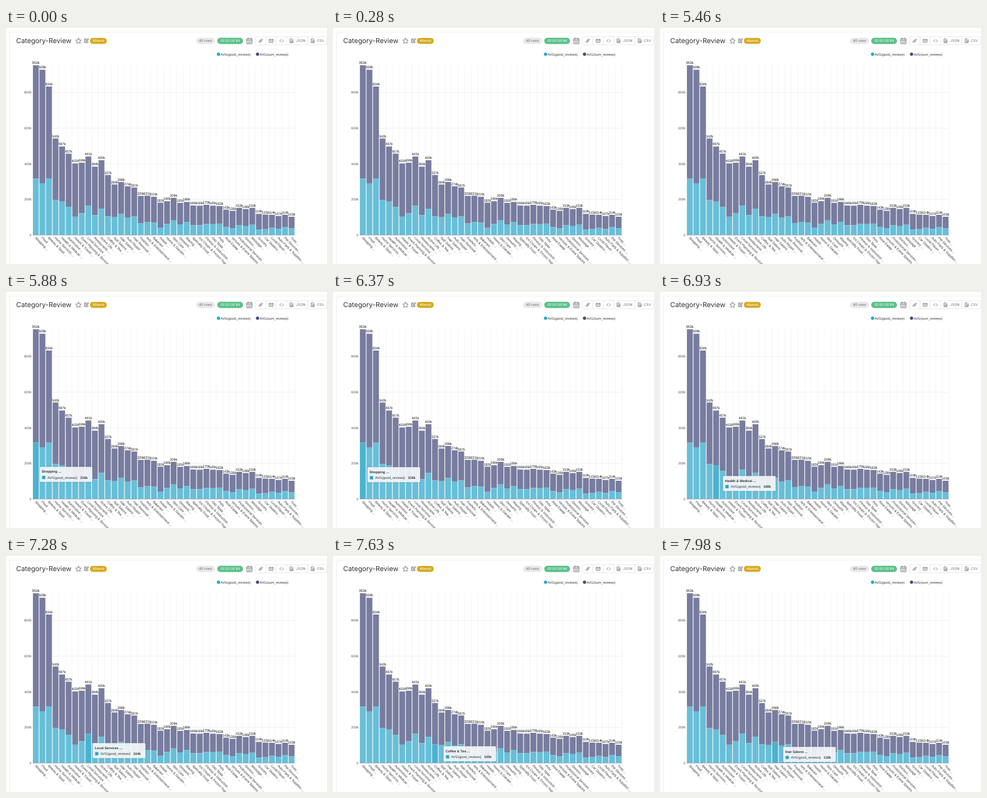
Write an HTML page that moves like this. It is 512 px wide and 375 px high and loops after 8000 ms.

```html
<!DOCTYPE html>
<html lang="en">
<head>
<meta charset="utf-8">
<title>Category-Review</title>
<style>
  html, body { margin: 0; width: 100%; height: 100%; overflow: hidden; background: #fff; }
  svg { display: block; width: 100%; height: 100%; }
  text { font: 5.4px "Liberation Sans", Arial, sans-serif; fill: #333; text-rendering: geometricPrecision; }
  .ui text { font-family: Inter, sans-serif; fill: #666; }
  .ui .title { font-size: 10.8px; fill: #333; }
  .ui .light { fill: #fff; }
  .icon { fill: none; stroke: #666; stroke-width: .8; stroke-linejoin: round; stroke-linecap: round; }
  .frame { fill: none; stroke: #e2e2e2; stroke-width: .7; }
  .value { fill: #111; stroke: #fff; stroke-width: .7; paint-order: stroke; text-anchor: middle; }
  .tick { fill: #555; text-anchor: end; }
  .bold { font-weight: 700; }
  #tip { filter: drop-shadow(0 0 1.3px rgba(0, 0, 0, .25)); }
</style>
</head>
<body>
<svg viewBox="0 0 512 375" preserveAspectRatio="none">
  <path class="frame" d="M0 6.5H512M5.5 6.5V375" stroke-opacity=".7"/>
  <g class="ui">
    <text class="title" x="16.3" y="24.3">Category-Review</text>
    <path class="icon" d="M115.6 16l1.3 2.9 3.1.3-2.3 2.1.7 3.1-2.8-1.6-2.8 1.6.7-3.1-2.3-2.1 3.1-.3z"/>
    <path class="icon" style="stroke:#444" d="M128 17.6h-2.6v5.6h5.2v-2.4M127.6 21l.3-1.4 3-3 1 1-3 3z"/>
    <rect x="133.8" y="15.7" width="27" height="9.6" rx="4.8" fill="#d6ab22"/>
    <text class="light" x="147.3" y="22.4" text-anchor="middle" font-weight="500">Altered</text>
    <rect x="303.3" y="15.6" width="29.8" height="9.8" rx="4.9" fill="#e8e8e8"/>
    <text x="318.2" y="22.4" text-anchor="middle">40 rows</text>
    <rect x="337" y="15.6" width="41" height="9.8" rx="4.9" fill="#5ac189"/>
    <text class="light" x="357.5" y="22.4" text-anchor="middle">00:00:00.84</text>
    <path class="icon" d="M384.3 17h8v8h-8zM384.3 19.4h8M386.3 15.8v2M390.3 15.8v2"/>
    <path class="icon" stroke-dasharray=".8 1.2" d="M386 21.4h5M386 23.2h5"/>
    <rect class="frame" x="397.7" y="13.7" width="113.6" height="13" rx="2"/>
    <path class="frame" d="M414.5 13.7v13M430.8 13.7v13M447.7 13.7v13M481.5 13.7v13"/>
    <g class="icon">
      <rect x="-2" y="-1.1" width="3.4" height="2.2" rx="1.1" transform="translate(405.5 21.3) rotate(-45)"/>
      <rect x="-1.4" y="-1.1" width="3.4" height="2.2" rx="1.1" transform="translate(407.5 19.3) rotate(-45)"/>
      <path d="M420.2 18.2h5.8v4.4h-5.8zl2.9 2.4 2.9-2.4M438.4 18.6l-1.8 1.8 1.8 1.8M440.8 18.6l1.8 1.8-1.8 1.8"/>
      <path id="file" d="M453.4 17.2h2.8l1.6 1.6v4.6h-4.4zM454.6 20.2h2M454.6 21.8h2"/>
      <use href="#file" x="33.8"/>
    </g>
    <text x="461.3" y="22.4">.JSON</text>
    <text x="494.8" y="22.4">.CSV</text>
  </g>
  <circle cx="339" cy="41.6" r="2.6" fill="#1fa8c9"/>
  <text x="342.3" y="43.5">AVG(good_reviews)</text>
  <circle cx="401.2" cy="41.6" r="2.6" fill="#454e7c"/>
  <text x="404.5" y="43.5">AVG(sum_reviews)</text>
  <g id="chart"></g>
  <g id="tip">
    <rect width="84" height="24" rx="1.6" fill="#fafbfd" fill-opacity=".9"/>
    <text id="tipName" class="bold" x="3.3" y="9.6"></text>
    <rect x="3.8" y="14.3" width="5.2" height="5.2" fill="#2ba5c6"/>
    <text x="12.3" y="18.9">AVG(good_reviews)</text>
    <text id="tipValue" class="bold" x="64.6" y="18.9"></text>
  </g>
</svg>
<script>
const names = `Shopping|Food|Beauty & Spas|Home Services|Health & Medical|Automotive|Hotels & Travel|Event Planning & Services|Local Services|Restaurants|Active Life|Coffee & Tea|Nail Salons|Hair Salons|Auto Repair|Hair Removal|Fashion|Arts & Entertainment|Bakeries|Hotels|Home & Garden|Skin Care|Desserts|Waxing|Specialty Food|Ice Cream & Frozen Yogurt|Fitness & Instruction|Day Spas|Pets|Real Estate|Venues & Event Spaces|Professional Services|Doctors|Massage|Grocery|Car Dealers|Local Flavor|Auto Parts & Supplies|Pet Services|Tires`
  .split('|').map(name => name + ' ...');
const sums = [953, 928, 834, 542, 497, 457, 402, 406, 441, 384, 420, 337, 284, 298, 274, 267, 220, 221, 215, 182,
  190, 209, 181, 186, 166, 165, 170, 165, 163, 143, 136, 153, 146, 153, 119, 115, 114, 107, 114, 103];
const goods = [316, 290, 318, 196, 188, 157, 103, 122, 164, 112, 148, 105, 100, 118, 99, 104, 65, 74, 70, 40,
  62, 82, 60, 74, 55, 55, 62, 61, 64, 45, 37, 56, 50, 58, 30, 33, 40, 34, 46, 37];

const LEFT = 42.4, PITCH = 10.46, BAR = 9.3, BASE = 329, RIGHT = LEFT + PITCH * names.length;
const GOOD = '#67bfd8', GOOD_HOVER = '#4ab3d0', SUM = '#787c9f';
const $ = id => document.getElementById(id);
const yOf = value => BASE - value * .2831;

function add(tag, attrs, text = '') {
  const node = document.createElementNS('http://www.w3.org/2000/svg', tag);
  for (const key in attrs) node.setAttribute(key, attrs[key]);
  node.textContent = text;
  return $('chart').appendChild(node);
}
const line = (d, stroke) => add('path', { d, stroke, 'stroke-width': .6, fill: 'none' });
const bar = (i, from, to, fill) => add('rect', {
  x: LEFT + PITCH * i + (PITCH - BAR) / 2, y: yOf(to), width: BAR, height: yOf(from) - yOf(to), fill
});

for (let i = 0; i <= names.length; i++) line(`M${LEFT + PITCH * i} 59V${BASE}`, '#eeeff2');
for (let value = 0; value <= 800; value += 200) {
  if (value) line(`M${LEFT} ${yOf(value)}H${RIGHT}`, '#e4e7ee');
  add('text', { class: 'tick', x: 40.6, y: yOf(value) + 1.9 }, value ? value + 'k' : '0');
}
const goodBars = goods.map((good, i) => {
  bar(i, good, sums[i], SUM);
  return bar(i, 0, good, GOOD);
});
line(`M${LEFT} ${BASE}H${RIGHT}`, '#8d8f98');
names.forEach((name, i) => {
  const center = LEFT + PITCH * (i + .5);
  add('text', { class: 'value', x: center, y: yOf(sums[i]) - 1.9 }, sums[i] + 'k');
  add('text', { y: 1.9, transform: `translate(${center - .6} 332.6) rotate(45)` }, name);
});

// Tooltip path: time, x, y
const path = [[5530, 53, 280], [6020, 54, 277], [6230, 54, 277], [6370, 55, 278.3],
  [6930, 100.5, 292.3], [7630, 176.3, 302.2], [7980, 196.5, 303.2]];
const LOOP = 8000, STEP = 70, SHOW = 5460, FADE = 210;

function tipAt(time) {
  const next = path.findIndex(point => point[0] >= time);
  if (next < 1) return path[next < 0 ? path.length - 1 : 0].slice(1);
  const [a, b] = [path[next - 1], path[next]];
  const part = (time - a[0]) / (b[0] - a[0]);
  return [1, 2].map(k => a[k] + (b[k] - a[k]) * part);
}

function draw(now) {
  const time = Math.floor(now % LOOP / STEP) * STEP;
  const [x, y] = tipAt(time);
  const shown = time > SHOW;
  const hovered = Math.floor((x - 9 - LEFT) / PITCH);
  $('tip').setAttribute('transform', `translate(${x} ${y})`);
  $('tip').setAttribute('opacity', Math.max(0, Math.min(1, (time - SHOW) / FADE)));
  const index = Math.max(0, hovered);
  $('tipName').textContent = names[index];
  $('tipValue').textContent = goods[index] + 'k';
  goodBars.forEach((rect, i) => rect.setAttribute('fill', shown && i === index ? GOOD_HOVER : GOOD));
}

const start = performance.now();
function tick() {
  draw(performance.now() - start);
  requestAnimationFrame(tick);
}
tick();
</script>
</body>
</html>
```
